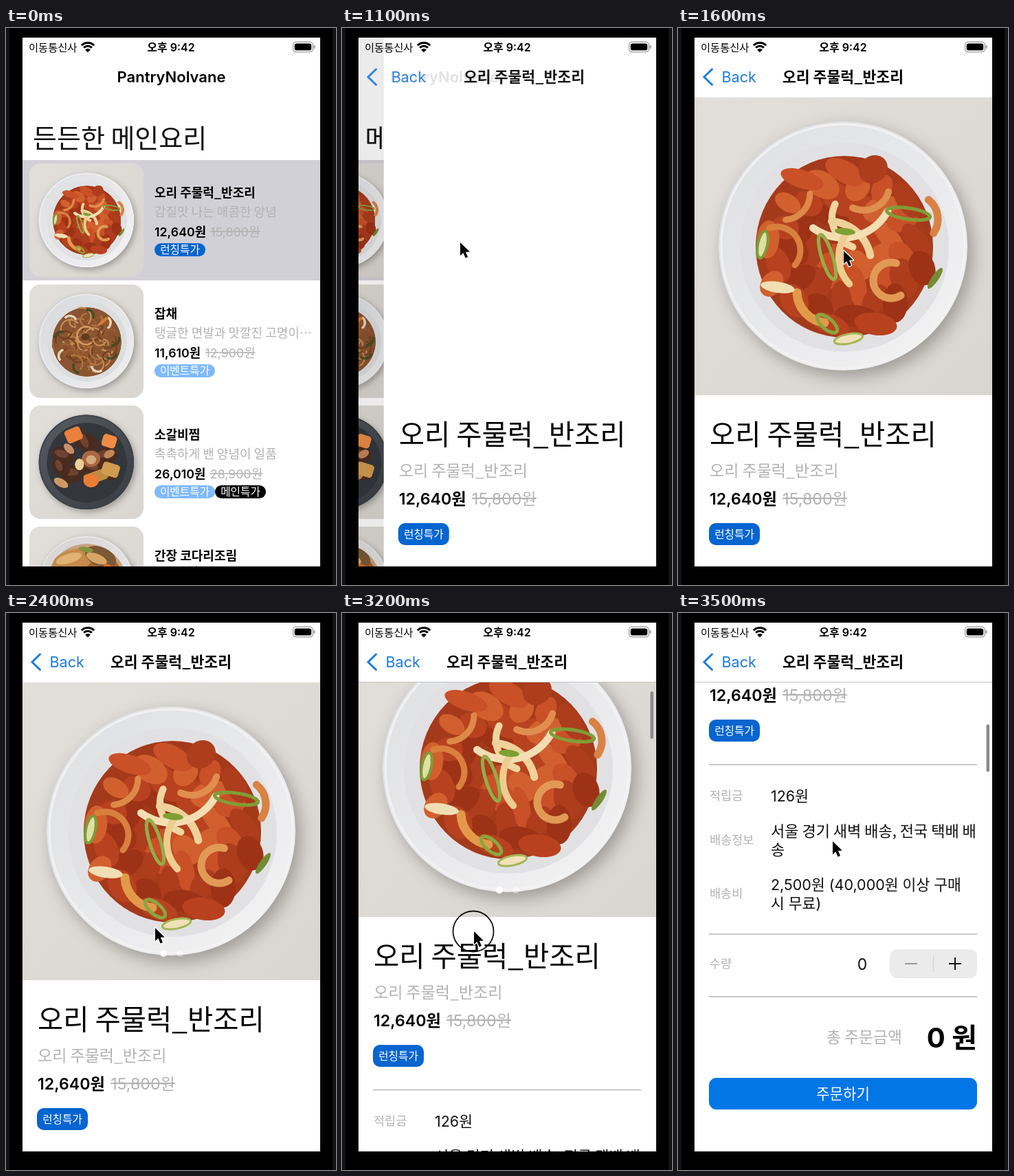
These frames come from a looping animation (480x810 px, 3600 ms). An HTML page with a canvas:

```html
<!DOCTYPE html>
<html lang="ko">
<head>
<meta charset="utf-8">
<title>PantryNolvane</title>
<style>
html, body { margin: 0; width: 100%; height: 100%; overflow: hidden; background: #000; }
canvas { display: block; width: 480px; height: 810px; }
</style>
</head>
<body>
<canvas id="stage" width="480" height="810"></canvas>
<script>
const ctx = document.getElementById('stage').getContext('2d');
const KR = '"Noto Sans CJK KR", "Noto Sans CJK", Inter, sans-serif';
const LATIN = 'Inter, "Noto Sans CJK KR", "Noto Sans CJK", sans-serif';
const LOOP = 3600, STEP = 100;
const BLUE = '#1a7bdd', GRAY = '#b2b2b2', BADGE = '#0765d0';
const L = 24, T = 14, W = 433, H = 769, BAR = 101;
const DISH = '오리 주물럭_반조리';

const lerp = (a, b, p) => a + (b - a) * p;

// keys: [time, ...values], linear between neighbours
function track(keys, t) {
  if (t <= keys[0][0]) return keys[0].slice(1);
  for (let i = 1; i < keys.length; i++) {
    const a = keys[i - 1], b = keys[i];
    if (t <= b[0]) {
      const p = (t - a[0]) / (b[0] - a[0]);
      return b.slice(1).map((v, k) => lerp(a[k + 1], v, p));
    }
  }
  return keys[keys.length - 1].slice(1);
}

function text(s, x, y, size, o = {}) {
  ctx.font = `${o.weight || 400} ${size}px ${o.font || KR}`;
  ctx.textAlign = o.align || 'left';
  ctx.fillStyle = o.color || '#111';
  ctx.fillText(s, x, y + size * 0.37);
  return ctx.measureText(s).width;
}

function pill(c, x, y, w, h, r, color) {
  c.fillStyle = color;
  c.beginPath();
  c.roundRect(x, y, w, h, r);
  c.fill();
}

function oval(c, x, y, rx, ry, rot, fill, stroke, width) {
  c.beginPath();
  c.ellipse(x, y, rx, ry, rot, 0, 7);
  if (fill) { c.fillStyle = fill; c.fill(); }
  if (stroke) { c.strokeStyle = stroke; c.lineWidth = width; c.stroke(); }
}

function arc(c, x, y, r, a, b, color, width) {
  c.beginPath();
  c.arc(x, y, r, a, b);
  c.strokeStyle = color;
  c.lineWidth = width;
  c.lineCap = 'round';
  c.stroke();
}

function line(x1, y1, x2, y2, color, width) {
  ctx.beginPath();
  ctx.moveTo(x1, y1);
  ctx.lineTo(x2, y2);
  ctx.strokeStyle = color;
  ctx.lineWidth = width;
  ctx.stroke();
}

function random(seed) {
  return () => (seed = (seed * 16807) % 2147483647) / 2147483647;
}

// ---- dishes, drawn once on 433 px squares ----

function plate(c, light, dark, well) {
  const bg = c.createLinearGradient(0, 0, W, W);
  bg.addColorStop(0, '#e2dfda');
  bg.addColorStop(1, '#d9d6d1');
  c.fillStyle = bg;
  c.fillRect(0, 0, W, W);
  c.shadowColor = 'rgba(80,75,70,.45)';
  c.shadowBlur = 24;
  c.shadowOffsetX = 7;
  c.shadowOffsetY = 9;
  const g = c.createLinearGradient(60, 60, 370, 370);
  g.addColorStop(0, dark);
  g.addColorStop(1, light);
  oval(c, 216, 216, 181, 181, 0, g);
  c.shadowColor = 'transparent';
  oval(c, 216, 216, 177, 177, 0, null, light, 3);
  oval(c, 218, 218, 152, 152, 0, well);
}

function heap(c, rnd, n, R, size, colors) {
  for (let i = 0; i < n; i++) {
    const a = i * 2.4, d = R * Math.sqrt((i + 0.5) / n);
    oval(c, 218 + d * Math.cos(a), 217 + d * Math.sin(a), size * (0.8 + rnd() * 0.5),
      size * (0.5 + rnd() * 0.3), rnd() * 3, colors[i % colors.length]);
  }
}

function pork(c) {
  const rnd = random(41);
  plate(c, '#f2f2f3', '#dfe0e2', '#e1e1e3');
  oval(c, 218, 217, 129, 132, 0, '#a53a1b');
  heap(c, rnd, 46, 122, 25, ['#b8421f', '#c95027', '#9e3216', '#d2602f', '#ad3d1d']);
  arc(c, 130, 140, 38, 0, 1.5, '#dd8a48', 9);
  arc(c, 286, 266, 26, 1, 5, '#e09a55', 11);
  arc(c, 318, 177, 36, -0.9, 0.6, '#d98243', 11);
  arc(c, 195, 282, 46, 1.7, 3.1, '#e29a4a', 13);
  arc(c, 120, 222, 34, -1.9, 0.7, '#d9803f', 9);
  arc(c, 246, 126, 38, 0.3, 2, '#df8e4d', 10);
  arc(c, 245, 175, 45, 1.9, 3.6, '#f0d5a0', 10);
  arc(c, 195, 242, 62, -1.5, -0.2, '#eed29a', 11);
  arc(c, 216, 130, 74, 0.5, 2.2, '#f3deb4', 11);
  arc(c, 268, 232, 58, 2.4, 3.9, '#edcd8f', 10);
  oval(c, 121, 276, 25, 8, 0.15, '#f1dfb4');
  oval(c, 224, 351, 21, 7, -0.2, '#f0e2b8', '#a4b557', 3);
  oval(c, 311, 169, 32, 8, 0.15, null, '#7f9d38', 5);
  oval(c, 99, 214, 7, 20, 0.2, '#dfdfa5', '#7c9c34', 4);
  oval(c, 193, 329, 18, 8, 0.7, null, '#8aa640', 5);
  oval(c, 193, 232, 8, 34, -0.3, null, '#93ad49', 5);
  oval(c, 219, 195, 15, 5, 0.1, '#7da131');
  oval(c, 350, 263, 5, 18, 0.6, '#728c35');
}

function noodles(c) {
  const rnd = random(77);
  plate(c, '#eeeeef', '#d9dbdd', '#dcddde');
  oval(c, 218, 219, 131, 132, 0, '#8a5430');
  for (let i = 0; i < 52; i++) {
    const a = i * 2.4, d = 100 * Math.sqrt(i / 52), s = rnd() * 6;
    arc(c, 218 + d * Math.cos(a), 219 + d * Math.sin(a), 18 + rnd() * 18, s, s + 2.6,
      ['#b0743f', '#c28a54', '#75401f', '#9a5d30'][i % 4], 6);
  }
  for (let i = 0; i < 9; i++) {
    const a = i * 0.72 + 0.4, x = 218 + 98 * Math.cos(a), y = 219 + 98 * Math.sin(a);
    arc(c, x, y, 25, a, a + 1.7, i % 2 ? '#e6d4b8' : '#434c25', 9);
  }
  arc(c, 215, 195, 34, 1, 5.6, '#d29a62', 7);
  oval(c, 212, 200, 16, 13, 0, '#643c22');
  oval(c, 280, 140, 26, 6, -0.7, '#dd7b32');
}

function ribs(c) {
  const rnd = random(19);
  plate(c, '#3b3f45', '#555a60', '#33363b');
  for (const [x, y, w, h, r] of [[130, 190, 45, 34, 0.3], [165, 260, 48, 35, -0.4],
    [120, 235, 38, 30, 0.8], [215, 140, 50, 34, 0.4], [290, 190, 42, 34, -0.3],
    [240, 235, 52, 34, 0.2], [300, 255, 38, 28, 0.5]]) {
    oval(c, x, y, w, h, r, '#4a2b20');
    oval(c, x - 8, y - 6, w * 0.6, h * 0.4, r + rnd(), '#70432f');
  }
  const block = (x, y, w, h, r, color) => {
    c.save();
    c.translate(x, y);
    c.rotate(r);
    pill(c, -w / 2, -h / 2, w, h, 12, color);
    c.restore();
  };
  block(252, 272, 92, 42, -0.35, '#c28b43');
  block(308, 245, 66, 50, 0.3, '#d09b50');
  block(168, 112, 62, 52, -0.4, '#e9803c');
  block(303, 136, 54, 48, 0.3, '#ef8b43');
  oval(c, 234, 287, 29, 25, 0, '#eb7c36');
  oval(c, 234, 203, 35, 31, 0, '#a9683f');
  oval(c, 234, 207, 19, 17, 0, '#d9a77c');
  oval(c, 120, 295, 30, 15, 0.5, '#cb9a64');
  oval(c, 190, 225, 17, 22, 0, '#ebcf96');
  oval(c, 150, 165, 24, 14, 0.8, '#c98f68');
  oval(c, 303, 185, 22, 14, -0.5, '#c28758');
}

function fish(c) {
  plate(c, '#eceaea', '#d6d5d5', '#c8a27c');
  oval(c, 218, 218, 140, 138, 0, '#a8622d');
  oval(c, 165, 130, 78, 42, -0.25, '#c58a4c');
  oval(c, 270, 115, 62, 36, 0.4, '#7b5836');
  oval(c, 255, 122, 42, 18, 0.4, '#d8a566');
  oval(c, 150, 122, 50, 18, -0.3, '#e0b375');
  oval(c, 310, 165, 34, 14, 0.6, '#d6702d');
  oval(c, 215, 88, 28, 10, 0.2, '#84923d');
}

const photos = [pork, noodles, ribs, fish].map(draw => {
  const cv = document.createElement('canvas');
  cv.width = cv.height = W;
  draw(cv.getContext('2d'));
  return cv;
});

// ---- interface ----

const event = ['이벤트특가', '#80bafa', 88];
const rows = [
  { name: DISH, note: '감칠맛 나는 매콤한 양념', price: '12,640원', old: '15,800원', tags: [['런칭특가', BADGE, 74]] },
  { name: '잡채', note: '탱글한 면발과 맛깔진 고명이…', price: '11,610원', old: '12,900원', tags: [event] },
  { name: '소갈비찜', note: '촉촉하게 밴 양념이 일품', price: '26,010원', old: '28,900원', tags: [event, ['메인특가', '#000', 74]] },
  { name: '간장 코다리조림', note: '', price: '', old: '', tags: [] }
];

function prices(now, old, x, y, size) {
  if (!now) return;
  const x2 = x + text(now, x, y, size, { weight: 600, font: LATIN, color: '#000' }) + size * 0.36;
  const w = text(old, x2, y, size, { font: LATIN, color: GRAY });
  line(x2, y, x2 + w, y, GRAY, size > 20 ? 2 : 1.6);
}

function list() {
  ctx.fillStyle = '#fff';
  ctx.fillRect(L, T, W, H);
  text('든든한 메인요리', 39, 160, 38, { weight: 500 });
  ctx.fillStyle = '#d1d0d7';
  ctx.fillRect(L, 192, W, 175);
  rows.forEach((row, i) => {
    const y = 197 + i * 176;
    ctx.save();
    ctx.beginPath();
    ctx.roundRect(34, y, 166, 165, 16);
    ctx.clip();
    ctx.drawImage(photos[i], 34, y, 166, 165);
    ctx.restore();
    text(row.name, 216, y + 42, 18, { weight: 600, color: '#000' });
    text(row.note, 216, y + 70, 18, { color: GRAY });
    prices(row.price, row.old, 216, y + 99, 17.8);
    let x = 216;
    for (const [label, color, w] of row.tags) {
      pill(ctx, x, y + 116, w, 19, 9.5, color);
      text(label, x + w / 2, y + 125.5, 15.7, { weight: 500, color: '#fff', align: 'center' });
      x += w;
    }
  });
}

function detail(scroll, photo, dots) {
  ctx.fillStyle = '#fff';
  ctx.fillRect(L, T, W, H);
  ctx.save();
  ctx.beginPath();
  ctx.rect(L, BAR, W, T + H - BAR);
  ctx.clip();
  ctx.translate(0, -scroll);
  if (photo) ctx.drawImage(photos[0], L, BAR);
  if (dots) {
    oval(ctx, 229, 495, 5, 5, 0, '#fff');
    oval(ctx, 253, 495, 5, 5, 0, 'rgba(255,255,255,.4)');
  }
  text(DISH, 46, 591, 40.5, { color: '#000' });
  text(DISH, 46, 643, 23, { color: GRAY });
  prices('12,640원', '15,800원', 46, 684, 23.2);
  pill(ctx, 45, 720, 74, 32, 10, BADGE);
  text('런칭특가', 82, 736, 15.7, { weight: 500, color: '#fff', align: 'center' });

  for (const y of [785.5, 1032, 1123]) line(45, y, 435, y, '#b5b5b5', 1.6);
  const label = (s, y) => text(s, 46, y, 17.5, { color: GRAY });
  label('적립금', 831);
  label('배송정보', 895);
  label('배송비', 973);
  label('수량', 1075);
  text('126원', 135, 831, 21.5, { font: LATIN });
  text('서울 경기 새벽 배송, 전국 택배 배', 135, 882, 22);
  text('송', 135, 909, 22);
  text('2,500원 (40,000원 이상 구매', 135, 960, 21.5, { font: LATIN });
  text('시 무료)', 135, 987, 21.5, { font: LATIN });

  text('0', 268, 1075, 23, { font: LATIN, align: 'center' });
  pill(ctx, 308, 1054, 127, 42, 10, '#ebebec');
  line(330, 1075, 348, 1075, '#9b9b9b', 2);
  line(371.5, 1063, 371.5, 1087, '#d4d4d6', 1.5);
  line(394, 1075, 412, 1075, '#111', 2);
  line(403, 1066, 403, 1084, '#111', 2);

  text('총 주문금액', 216, 1182, 22.8, { color: GRAY });
  text('0 원', 435, 1182, 40, { weight: 700, font: LATIN, color: '#000', align: 'right' });
  pill(ctx, 45, 1241, 390, 46, 11, '#0376e6');
  text('주문하기', 240, 1264, 21.2, { weight: 500, color: '#fff', align: 'center' });
  ctx.restore();

  if (scroll > 0) {
    line(L, 100.5, L + W, 100.5, '#c4c4c4', 1);
    pill(ctx, 448.5, 104.7 + scroll * 0.1015, 4.5, 69, 2.2, '#8a8a8a');
  }
}

function status() {
  text('이동통신사', 33, 28, 15.3, { color: '#000' });
  text('오후 9:42', 240, 28, 16, { weight: 600, font: LATIN, color: '#000', align: 'center' });
  for (const r of [13, 8.3]) {
    ctx.lineCap = 'butt';
    ctx.beginPath();
    ctx.arc(119, 34.5, r, -Math.PI * 0.75, -Math.PI * 0.25);
    ctx.strokeStyle = '#000';
    ctx.lineWidth = 3;
    ctx.stroke();
  }
  ctx.fillStyle = '#000';
  ctx.beginPath();
  ctx.moveTo(119, 35.5);
  ctx.arc(119, 35.5, 5.4, -Math.PI * 0.75, -Math.PI * 0.25);
  ctx.fill();
  ctx.strokeStyle = '#9a9a9a';
  ctx.lineWidth = 1.3;
  ctx.beginPath();
  ctx.roundRect(417.6, 20.2, 28.8, 14.6, 4.5);
  ctx.stroke();
  pill(ctx, 419.8, 22.4, 24.4, 10.2, 2.8, '#000');
  pill(ctx, 447.6, 25, 2, 5, 1, '#9a9a9a');
}

// rest: 1 = list in place, 0 = detail in place
function navBar(rest) {
  ctx.globalAlpha = rest === 1 ? 1 : Math.min(1, rest * 1.4);
  text('PantryNolvane', 240.5 - 100 * (1 - rest), 71, 22, { weight: 600, font: LATIN, color: '#000', align: 'center' });
  ctx.globalAlpha = 1 - rest;
  ctx.beginPath();
  ctx.moveTo(49.5, 60);
  ctx.lineTo(38, 71.3);
  ctx.lineTo(49.5, 82.5);
  ctx.strokeStyle = BLUE;
  ctx.lineWidth = 3;
  ctx.lineCap = 'round';
  ctx.stroke();
  ctx.lineCap = 'butt';
  text('Back', 63.5 + 97 * rest, 71, 21.5, { font: LATIN, color: BLUE });
  text(DISH, 240 + 295 * rest, 71, 21.6, { weight: 600, color: '#000', align: 'center' });
  ctx.globalAlpha = 1;
}

const pointerPath = [[100, 324, 762], [300, 250, 520], [500, 186, 350], [700, 172, 311], [1100, 172, 312],
  [1600, 241, 324], [2400, 217, 458], [3000, 190, 555], [3100, 190, 547], [3200, 192, 463],
  [3300, 202, 390], [3400, 215, 346], [3500, 225, 332]];
const scrollPath = [[3000, 0], [3100, 8], [3200, 92], [3300, 262], [3400, 440], [3500, 565]];

function pointer(t) {
  if (t < 100) return;
  const [x, y] = track(pointerPath, t);
  if (t >= 3100 && t <= 3200) oval(ctx, x - 1, y, 29.5, 29.5, 0, null, '#111', 1.8);
  ctx.beginPath();
  [[0, 0], [0, 19], [4.4, 15], [7.6, 22.5], [11, 21], [7.8, 13.8], [13.8, 13.5]]
    .forEach(([dx, dy]) => ctx.lineTo(x + dx, y + dy));
  ctx.closePath();
  ctx.lineJoin = 'round';
  ctx.strokeStyle = '#fff';
  ctx.lineWidth = 2.6;
  ctx.stroke();
  ctx.fillStyle = '#000';
  ctx.fill();
  ctx.lineJoin = 'miter';
}

// critically damped slide
function slide(t) {
  const u = Math.max(0, t - 905) * 0.021;
  return t > 1300 ? 0 : (1 + u) * Math.exp(-u);
}

function draw(t) {
  ctx.fillStyle = '#000';
  ctx.fillRect(0, 0, 480, 810);
  ctx.fillStyle = '#131313';
  ctx.fillRect(0, 0, 5, 810);
  ctx.fillRect(475, 0, 5, 810);
  ctx.save();
  ctx.beginPath();
  ctx.rect(L, T, W, H);
  ctx.clip();
  const rest = slide(t);
  if (rest > 0) {
    ctx.save();
    ctx.translate(-0.3 * W * (1 - rest), 0);
    list();
    ctx.restore();
  }
  if (rest < 1) {
    ctx.fillStyle = `rgba(0,0,0,${0.085 * (1 - rest)})`;
    ctx.fillRect(L, T, W, H);
    ctx.save();
    ctx.translate(W * rest, 0);
    detail(track(scrollPath, t)[0], t >= 1400, t >= 2000);
    ctx.restore();
  }
  navBar(rest);
  status();
  pointer(t);
  ctx.restore();
}

const start = performance.now();
function tick() {
  const t = (performance.now() - start) % LOOP;
  draw(Math.floor(t / STEP) * STEP);
  requestAnimationFrame(tick);
}
tick();
</script>
</body>
</html>
```
